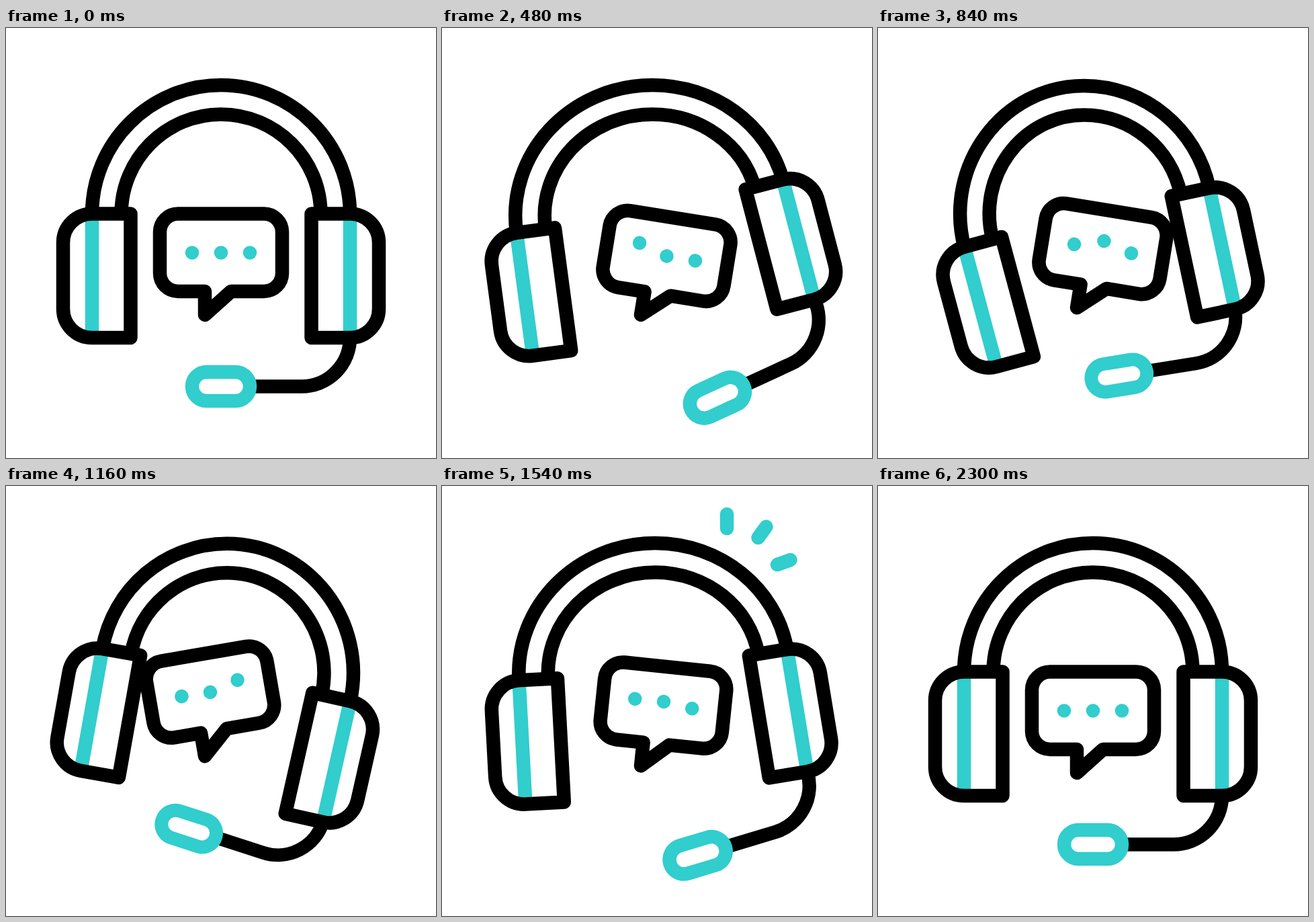
These frames come from a looping animation (640x640 px, 2.4 s). An HTML page:

```html
<!DOCTYPE html>
<html lang="en">
<head>
<meta charset="utf-8">
<title>Support headset</title>
<style>
  html, body { margin: 0; width: 100%; height: 100%; overflow: hidden; background: #fff; }
  svg { display: block; width: 100%; height: 100%; }
  .line { fill: none; stroke: #000; stroke-width: 20.5; stroke-linejoin: round; }
  .teal { stroke: #32cdcd; }
  .dot { fill: #32cdcd; }
  .spark { stroke-linecap: round; }
</style>
</head>
<body>
<svg viewBox="0 0 640 640">
  <defs>
    <g id="cup">
      <path class="line teal" d="M128 280V458"/>
      <path class="line" d="M128 276.5H185.5V461H128A43 43 0 0 1 85 418V319.5A43 43 0 0 1 128 276.5Z"/>
    </g>
  </defs>
  <g id="mic">
    <path class="line" d="M512 461A72 72.5 0 0 1 440 533.5H365"/>
    <rect class="line teal" x="277" y="512" width="86" height="43" rx="21.5"/>
  </g>
  <path id="outer" class="line"/>
  <path id="inner" class="line"/>
  <g id="left"><use href="#cup"/></g>
  <g id="right"><use href="#cup" transform="translate(640) scale(-1 1)"/></g>
  <g id="bubble">
    <path class="line" d="M256 276.5H384A27 27 0 0 1 411 303.5V365A27 27 0 0 1 384 392H335L296 427V392H256A27 27 0 0 1 229 365V303.5A27 27 0 0 1 256 276.5Z"/>
    <circle class="dot" cx="277" r="10.3"/>
    <circle class="dot" cx="320" r="10.3"/>
    <circle class="dot" cx="363" r="10.3"/>
  </g>
  <g id="sparks">
    <path class="line teal spark" d="M424 63V42"/>
    <path class="line teal spark" d="M470.5 77L482.5 60.5"/>
    <path class="line teal spark" d="M499 117L518.5 110"/>
  </g>
</svg>
<script>
const LOOP = 2400;
const PIVOT = { x: 320, y: 297 };
const RAD = Math.PI / 180;
const $ = id => document.getElementById(id);
const place = (id, transform) => $(id).setAttribute('transform', transform);
const dots = document.querySelectorAll('.dot');
const sparks = document.querySelectorAll('.spark');

// Sine ease between [time, value] keys.
function ease(t, ...keys) {
  const next = keys.findIndex(key => key[0] > t);
  if (next === 0) return keys[0][1];
  if (next < 0) return keys[keys.length - 1][1];
  const [t0, v0] = keys[next - 1], [t1, v1] = keys[next];
  return v0 + (v1 - v0) * (1 - Math.cos(Math.PI * (t - t0) / (t1 - t0))) / 2;
}

// Bell curve from 0 to 1 and back around a centre.
function bell(t, centre, half) {
  const d = Math.min(1, Math.abs(t - centre) / half);
  return (1 + Math.cos(Math.PI * d)) / 2;
}

// The mic leads the swing, the right cup follows, the left cup trails.
const micTurn = t => ease(t, [220, 0], [500, -25], [600, -25], [1180, 18], [1520, -17], [1790, 0]);
const rightTurn = t => ease(t, [220, 0], [540, -16], [730, -16], [1190, 13], [1520, -9.5], [1790, 0]);
const leftTurn = t => ease(t, [220, 0], [770, -16.5], [1280, 14], [1570, -3.5], [1790, 0]);
const bubbleTurn = t => ease(t, [220, 0], [540, 10], [790, 10], [1190, -10], [1690, 10], [1830, 10], [2290, 0]);

// The band widens when the left cup trails the right one.
function pose(side, turn, mean, twist) {
  return { side, turn, dx: 0.42 * mean + side * 1.6 * twist, dy: -side * 0.4 * twist };
}

function onCup({ turn, dx, dy }, x, y) {
  const c = Math.cos(turn * RAD), s = Math.sin(turn * RAD);
  const px = x - PIVOT.x, py = y - PIVOT.y;
  return { x: PIVOT.x + dx + px * c - py * s, y: PIVOT.y + dy + px * s + py * c };
}

function drawCup(id, { turn, dx, dy }) {
  place(id, `translate(${dx} ${dy}) rotate(${turn} ${PIVOT.x} ${PIVOT.y})`);
}

// Half of the headband: elliptical arc from the crown to one cup.
function bandHalf(cup, radius, top) {
  const end = onCup(cup, 320 + cup.side * radius, 277);
  const a = cup.side * cup.turn * RAD;
  const rx = Math.abs(end.x - top.x) / Math.cos(a);
  const ry = (end.y - top.y) / (1 + Math.sin(a));
  const k = 4 / 3 * Math.tan((Math.PI / 2 + a) / 4);
  return {
    end: `${end.x} ${end.y}`,
    low: `${end.x + k * cup.side * rx * Math.sin(a)} ${end.y - k * ry * Math.cos(a)}`,
    high: `${top.x + cup.side * k * rx} ${top.y}`
  };
}

function drawBand(id, radius, crown, left, right) {
  const top = { x: crown.x, y: crown.y - radius };
  const l = bandHalf(left, radius, top), r = bandHalf(right, radius, top);
  $(id).setAttribute('d',
    `M${l.end}C${l.low} ${l.high} ${top.x} ${top.y}C${r.high} ${r.low} ${r.end}`);
}

function drawHeadset(t) {
  const l = leftTurn(t), r = rightTurn(t);
  const mean = (l + r) / 2, twist = l - r, squeeze = Math.max(0, -twist);
  const left = pose(-1, l, mean, twist), right = pose(1, r, mean, twist);
  const crown = { x: 320 + 0.88 * l, y: 277 + 0.3 * squeeze };
  drawCup('left', left);
  drawCup('right', right);
  drawBand('outer', 192, crown, left, right);
  drawBand('inner', 148.5, crown, left, right);
  const joint = onCup(right, 512, 461);
  place('mic', `translate(${joint.x} ${joint.y}) rotate(${micTurn(t)})`
    + ` scale(${1 - 0.01 * squeeze}) translate(-512 -461)`);
}

function drawBubble(t) {
  const lift = -25 * bell(t, 1190, 640);
  place('bubble', `translate(0 ${lift}) rotate(${bubbleTurn(t)} 296 427)`);
  dots.forEach((dot, i) => {
    const first = 490 + 300 * i;
    const hop = bell(t, first, 280) + bell(t, first + 900, 280);
    dot.setAttribute('cy', 334.5 - 13 * hop);
  });
}

// Sparks grow outwards, then shrink away at their outer ends.
function drawSparks(t) {
  $('sparks').style.display = t > 1380 && t < 1720 ? '' : 'none';
  const head = ease(t, [1380, 0], [1540, 1]), tail = ease(t, [1550, 0], [1720, 1]);
  sparks.forEach(spark => {
    const size = spark.getTotalLength();
    spark.style.strokeDasharray = `${Math.max(0.01, (head - tail) * size)} 100`;
    spark.style.strokeDashoffset = -tail * size;
  });
}

function draw() {
  const t = performance.now() % LOOP;
  drawHeadset(t);
  drawBubble(t);
  drawSparks(t);
  requestAnimationFrame(draw);
}
draw();
</script>
</body>
</html>
```
